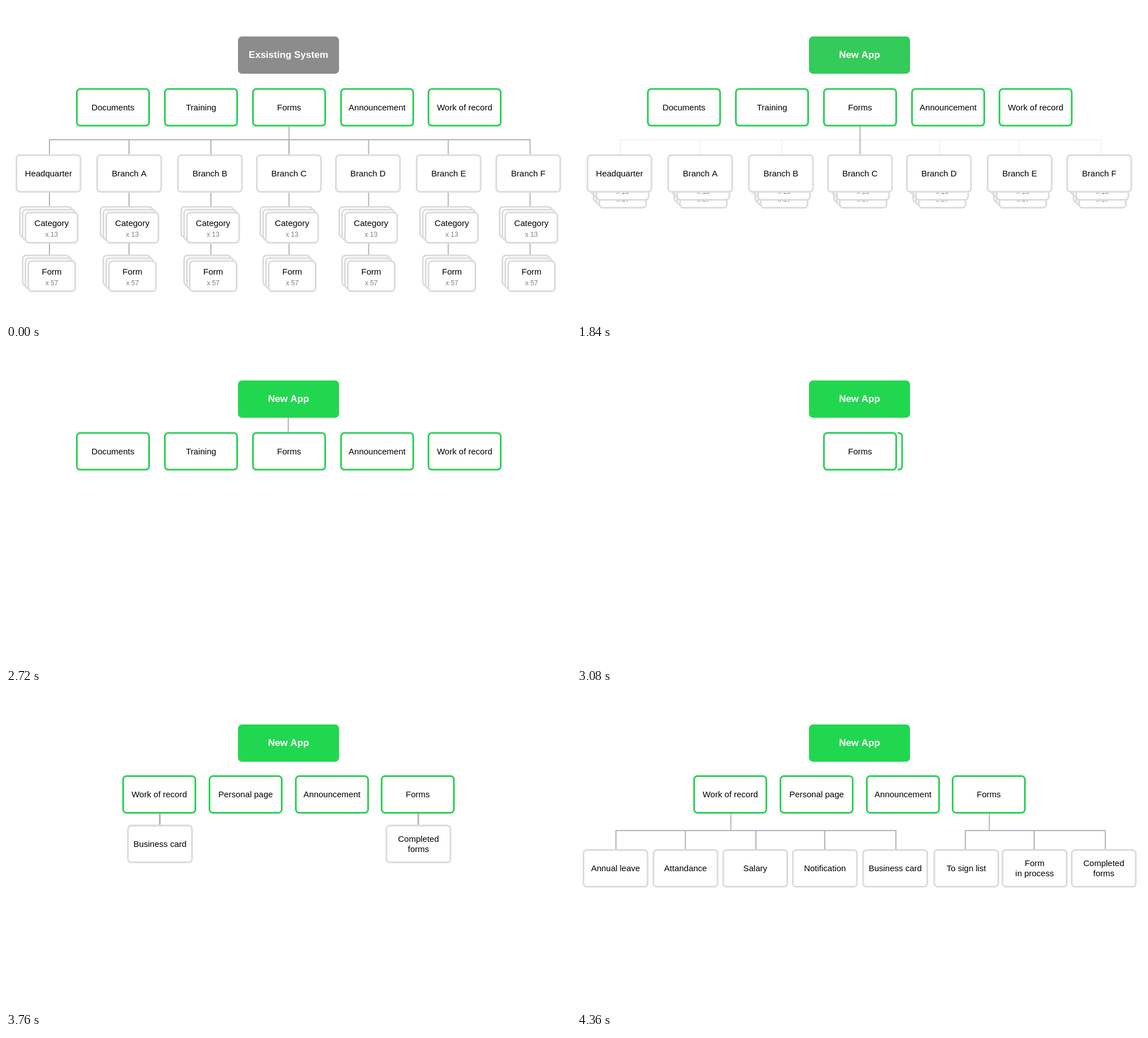
Animation of 1001x560 px, one loop 6800 ms. Source, as an HTML page with a canvas:

```html
<!DOCTYPE html>
<html>
<head>
<meta charset="utf-8">
<style>
html, body { margin: 0; width: 100%; height: 100%; overflow: hidden; background: #fff; }
canvas { display: block; }
</style>
</head>
<body>
<canvas id="stage" width="1001" height="560"></canvas>
<script>
const ctx = document.getElementById('stage').getContext('2d');
const LOOP = 6800;
const GREEN = '#2bd155', CARD = '#dcdcdc', LINE = '#b4b4b4';
const FONT = '"Liberation Sans", Arial, sans-serif';

const features = [['Documents', 124], ['Training', 280], ['Forms', 436], ['Announcement', 592], ['Work of record', 747]];
const branches = [
  ['Headquarter', 17, 77], ['Branch A', 160, 218], ['Branch B', 303, 363], ['Branch C', 443, 501.5],
  ['Branch D', 583, 642.5], ['Branch E', 726, 783.5], ['Branch F', 867, 928.5]
];
const pages = [['Work of record', 206], ['Personal page', 359], ['Announcement', 512], ['Forms', 664]];
const groups = [
  { left: 214.5, trunk: 272.5, items: [['Annual leave', 10, 69], ['Attandance', 134, 192], ['Salary', 257.5, 317], ['Notification', 381, 439], ['Business card', 505.5, 565]] },
  { left: 672.5, trunk: 730.5, items: [['To sign list', 631.5, 688], ['Form\nin process', 752.5, 810], ['Completed\nforms', 875, 936]] }
];
const branchOrder = [3, 2, 1, 4, 5, 6, 0];
const featureOrder = [3, 4, 1, 0, 2];

const mix = (a, b, p) => a + (b - a) * p;
function ease(t, start, end) {
  const p = Math.min(1, Math.max(0, (t - start) / (end - start)));
  return (1 - Math.cos(Math.PI * p)) / 2;
}

function text(str, x, y, size = 15, color = '#000', weight = 'normal') {
  ctx.font = `${weight} ${size}px ${FONT}`;
  ctx.textAlign = 'center';
  ctx.fillStyle = color;
  ctx.fillText(str, x, y);
}

function line(x1, y1, x2, y2) {
  ctx.strokeStyle = LINE;
  ctx.lineWidth = 2;
  ctx.beginPath();
  ctx.moveTo(x1, y1);
  ctx.lineTo(x2, y2);
  ctx.stroke();
}

function frame(x, y, w, h, color) {
  ctx.beginPath();
  ctx.roundRect(x + 1.5, y + 1.5, w - 3, h - 3, 6);
  ctx.fillStyle = '#fff';
  ctx.fill();
  ctx.strokeStyle = color;
  ctx.lineWidth = 3;
  ctx.stroke();
}

// An opaque tile whose white backing also covers its rounded corners.
function box(label, x, y, w, color) {
  ctx.fillStyle = '#fff';
  ctx.fillRect(x - 1, y, w + 2, 68);
  frame(x, y, w, 68, color);
  const rows = label.split('\n');
  rows.forEach((row, i) => text(row, x + w / 2, y + 39.4 + (i - (rows.length - 1) / 2) * 18));
}

const greenBox = (label, x, y) => box(label, x, y, 131, GREEN);
const greyBox = (label, x, y) => box(label, x, y, 116.5, CARD);

function stack(label, count, x, y, w) {
  for (const d of [10, 5, 0]) frame(x - d, y - d, w, 56.5, CARD);
  text(label, x + w / 2, y + 25.4);
  text(count, x + w / 2, y + 44.3, 12, '#808080');
}

function title(t) {
  const p = ease(t, 1600, 1928);
  ctx.fillStyle = `rgb(${mix(140, 34, p)},${mix(140, 215, p)},${mix(140, 80, p)})`;
  ctx.beginPath();
  ctx.roundRect(411, 54, 179, 66, 7);
  ctx.fill();
  text(t < 1600 ? 'Exsisting System' : 'New App', 500.5, 92, 17, '#fff', 'bold');
}

function branchTree(t) {
  const fold = ease(t, 1600, 1928), gather = ease(t, 1928, 2328), rise = ease(t, 2328, 2728);
  const lift = -118 * rise;
  if (fold < 1) {
    ctx.globalAlpha = 1 - fold;
    line(76, 237, 929.5, 237);
    branches.forEach(([, , x]) => line(x, 237, x, 264));
    ctx.globalAlpha = 1;
    for (const [, x, axis] of branches) {
      line(axis, 330, axis, 442 - 112 * fold);
      stack('Form', 'x 57', x + 21, 450.5 - 177 * fold, 86);
      stack('Category', 'x 13', x + 16, 364.5 - 91 * fold, 95.5);
    }
  }
  const trunk = mix(501.5, 500, gather);
  line(trunk, 212 + lift, trunk, 264 + lift);
  for (const i of branchOrder) {
    const [label, x] = branches[i];
    greyBox(label, mix(x, 442.5, gather), 262.8 + lift);
  }
}

function oldFeatures(t) {
  for (const i of featureOrder) {
    const [label, x] = features[i];
    const p = ease(t, 2728, i < 2 ? 3060 : 3128);
    greenBox(label, mix(x, 436, p), 145.6);
  }
}

function pageTree(t) {
  const drop = ease(t, 3516, 3916), spread = ease(t, 3952, 4352);
  const lift = -132 * (1 - drop);
  if (drop > 0) {
    for (const { left, trunk, items } of groups) {
      line(trunk, 211 + lift, trunk, 242 + lift);
      ctx.globalAlpha = spread < 0.2 ? 0 : (spread - 0.2) / 0.8;
      line(mix(trunk, items[0][2], spread) - 1, 242, mix(trunk, items[items.length - 1][2], spread) + 1, 242);
      ctx.globalAlpha = 1;
      for (const [label, x, axis] of items) {
        const ax = mix(trunk, axis, spread);
        line(ax, 242 + lift, ax, 276 + lift);
        greyBox(label, mix(left, x, spread), 275 + lift);
      }
    }
  }
  const open = ease(t, 3128, 3528);
  for (const [label, x] of pages) {
    const shown = label === 'Personal page' && t < 3528 ? 'Personal' : label;
    greenBox(shown, mix(436, x, open), mix(145.6, 144, open));
  }
}

function draw(t) {
  ctx.fillStyle = '#fff';
  ctx.fillRect(0, 0, 1001, 560);
  if (t < 3128) {
    if (t < 2728) branchTree(t);
    oldFeatures(t);
  } else {
    pageTree(t);
  }
  title(t);
}

const began = performance.now();
function tick() {
  draw((performance.now() - began) % LOOP);
  requestAnimationFrame(tick);
}
tick();
</script>
</body>
</html>
```
